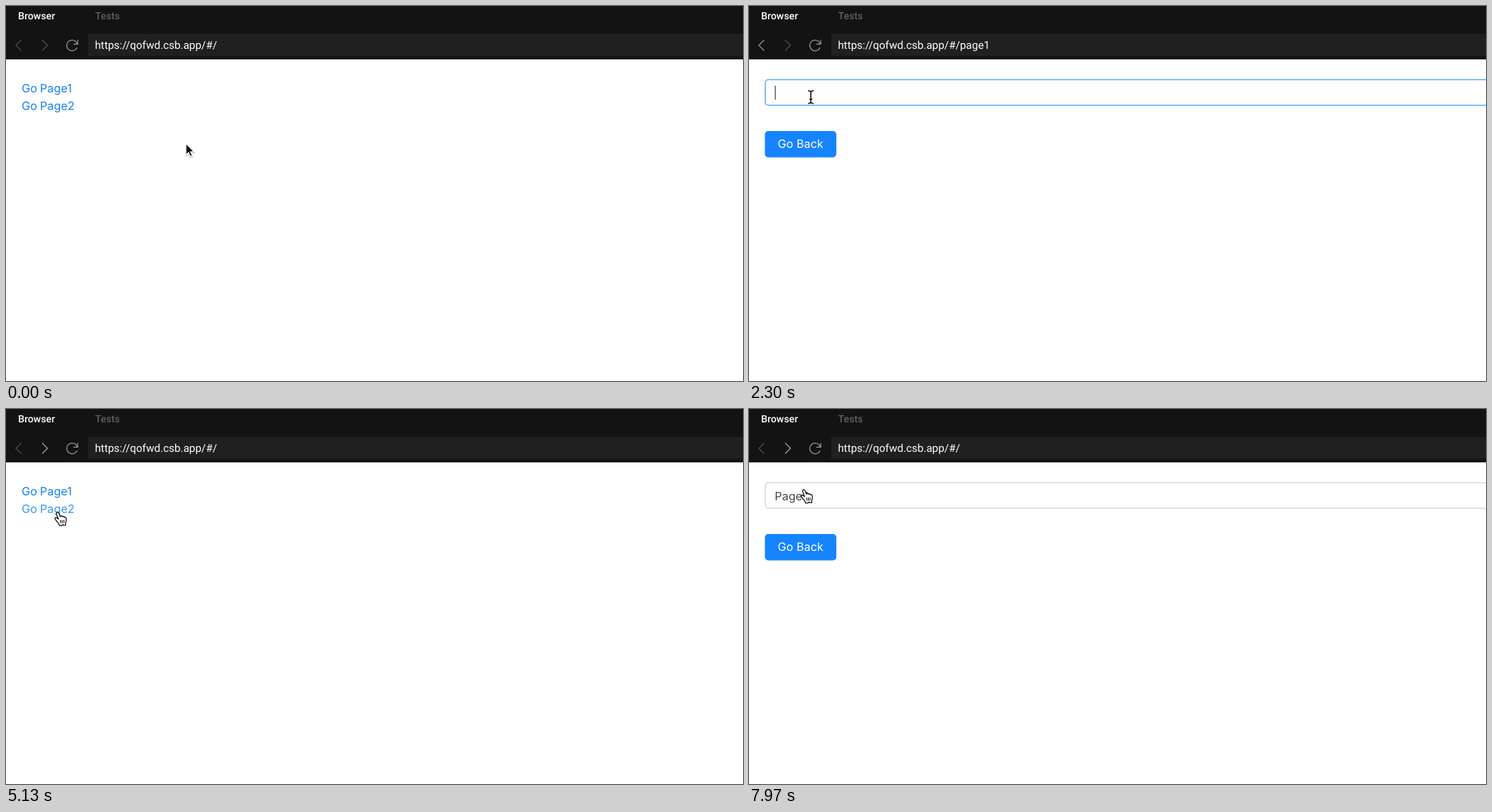
Recreate the animation shown at these times as an HTML page. Size 1048 px wide and 534 px high, loop 8000 ms.

```html
<!DOCTYPE html>
<html lang="en">
<head>
<meta charset="utf-8">
<title>Page navigation</title>
<style>
  html, body { margin: 0; width: 100%; height: 100%; overflow: hidden; background: #fff; }
  svg { display: block; width: 1048px; height: 534px; }
  text { white-space: pre; text-rendering: geometricPrecision; }
  .bar { font-family: Roboto, sans-serif; }
  .app { font-family: Inter, sans-serif; font-size: 16.4px; }
  .icon { fill: none; stroke-width: 1.2; }
</style>
</head>
<body>
<svg viewBox="0 0 1048 534">
  <rect width="1048" height="76" fill="#131313"/>
  <rect x="117" y="40" width="931" height="31" fill="#202020"/>
  <g class="bar">
    <text x="17.2" y="19" font-size="14.25" font-weight="500" fill="#fff">Browser</text>
    <text x="126.8" y="19" font-size="14.25" font-weight="500" fill="#606060">Tests</text>
    <text id="url" x="126.4" y="60.5" font-size="15.4" fill="#fff"></text>
  </g>
  <path id="back" class="icon" d="M21.5 48.5L14 56L21.5 63.5"/>
  <path id="forward" class="icon" d="M51.5 48.5L59 56L51.5 63.5"/>
  <path class="icon" stroke="#999" d="M101.3 54A7.6 7.6 0 1 0 101 59.2M102 48.3V54.3H95.8"/>

  <g id="home" class="app">
    <rect id="mark" x="48.6" y="129" width="48.8" height="25" fill="#4084fb"/>
    <text id="link1" y="123"><tspan x="22.3">Go</tspan><tspan x="48.3">Page1</tspan></text>
    <text id="link2" y="148"><tspan x="22.3">Go</tspan><tspan id="word2" x="48.3">Page2</tspan></text>
  </g>

  <g id="page" class="app">
    <rect id="glow" x="22.6" y="104.2" width="1100" height="37.8" rx="4.75" fill="none" stroke="#1784ff" stroke-width="4.8"/>
    <rect id="field" x="23.2" y="104.8" width="1100" height="36.6" rx="4.4" fill="#fff" stroke-width="1.3"/>
    <text id="value" x="36.6" y="130.3" fill="#484848"></text>
    <rect id="caret" y="113.5" width="1.1" height="20" fill="#333"/>
    <rect x="22.6" y="180" width="101.6" height="37" rx="4.75" opacity=".045"/>
    <rect id="button" x="22.6" y="178" width="101.6" height="37.4" rx="4.75"/>
    <text x="73.3" y="202.4" text-anchor="middle" fill="#fff">Go Back</text>
  </g>

  <g id="cursor">
    <g id="arrow">
      <path d="M0 1.5V17.5L3.8 14L6.2 19.8L9 18.6L6.6 13H11.4Z" opacity=".18" stroke="#000" stroke-width="2"/>
      <path d="M0 0V16L3.7 12.5L6 18.1L8.7 17L6.3 11.5H11.3Z" stroke="#fff" stroke-width="1.1"/>
    </g>
    <g id="hand" transform="translate(-6 -1)" stroke="#000" stroke-width="1.2" stroke-linejoin="round" stroke-linecap="round">
      <path fill="#fff" d="M6.4 17.4C5.6 15.8 4 14.6 2.6 12.5C1.6 11.2.6 10 1.2 9C1.9 8 3.3 8.3 4.2 9.2L6 10.8L3.6 4.4C2.9 2.5 3.1 1.1 4.4.8C5.7.6 6.5 1.6 7.1 3.2L8.7 7.2C9.2 5.9 11 5.8 11.6 7.3C12.4 6.5 14 6.7 14.5 8.2C15.5 7.6 16.9 8.2 17.1 9.8C17.5 12.5 17 14 16.3 16L16.2 19.5H13.6L12.4 18.3L11 19.8H7.4Z"/>
      <path fill="none" stroke-width="1" d="M9 12.5L9.2 16.2M11.4 12.4L11.5 16.2M13.8 12.4V16"/>
    </g>
    <g id="beam" fill="none">
      <path id="beamShape" stroke="#fff" stroke-width="3" opacity=".8" d="M-4 -9Q-.6 -9 0 -7.3Q.6 -9 4 -9M0 -7.5V7.5M-4 9Q-.6 9 0 7.3Q.6 9 4 9M-2.2 3H2.2"/>
      <path stroke="#000" stroke-width="1.5" d="M-4 -9Q-.6 -9 0 -7.3Q.6 -9 4 -9M0 -7.5V7.5M-4 9Q-.6 9 0 7.3Q.6 9 4 9M-2.2 3H2.2"/>
    </g>
  </g>
</svg>
<script>
const LOOP = 8000;
const el = {};
document.querySelectorAll('[id]').forEach(n => el[n.id] = n);

// Pointer path: time, x, y
const path = [
  [0, 256, 196], [270, 256, 196], [920, 80, 112], [1070, 75, 107], [1330, 75, 113],
  [1570, 76, 115], [1700, 86.5, 129.5], [1980, 86.5, 129.5], [2000, 87.5, 129.5],
  [3600, 92, 131], [3670, 128, 140.5], [3760, 130, 150], [4080, 80, 195],
  [4500, 79, 196], [5120, 74.5, 147], [5400, 74.5, 147], [5800, 74.5, 114],
  [6470, 74.5, 114], [6860, 77, 196], [7270, 77, 196], [7880, 79, 115], [8000, 79, 115]
];
const typing = [[2700, 'p'], [2830, 'pa'], [3030, 'pag'], [3170, 'page'], [3400, 'page1']];

// Time windows
const pages = [[1570, 4330], [5230, 7030], [7970, 8000]];
const focus = [[2220, 4230], [5830, 6960]];
const lit = [[1670, 4230], [5580, 6960]];
const press = [[3960, 4330], [6720, 7030]];
const hover1 = [[900, 1570], [7780, 7970]];
const hover2 = [[4900, 5230], [7560, 7780]];

const smooth = k => { k = Math.min(1, Math.max(0, k)); return k * k * (3 - 2 * k); };
const within = (t, list) => list.some(([a, b]) => t >= a && t < b);
const fade = (t, list) => list.reduce((s, [a, b]) => s + smooth((t - a) / 300) - smooth((t - b) / 300), 0);
const mix = (a, b, k) => `rgb(${a.map((v, i) => Math.round(v + (b[i] - v) * k))})`;
const show = (node, on) => node.style.display = on ? '' : 'none';
const setText = (node, s) => { if (node.textContent !== s) node.textContent = s; };

const BLUE = [23, 132, 255], LIGHT = [64, 158, 255], GREY = [208, 208, 208];
const LINK = [22, 128, 240], LINK_HOVER = [66, 155, 245];

function pointer(t) {
  let i = 1;
  while (i < path.length - 1 && path[i][0] <= t) i++;
  const [a, x, y] = path[i - 1], [b, u, v] = path[i];
  const k = smooth((t - a) / (b - a));
  return [x + (u - x) * k, y + (v - y) * k];
}

function pointerKind(x, y, onPage) {
  if (!onPage) return y >= 104 && y < 154 && x < 97 ? 'hand' : 'arrow';
  if (y >= 104 && y < 142) return 'beam';
  return y >= 178 && y < 216 && x < 124 ? 'hand' : 'arrow';
}

function drawBar(t) {
  const first = t >= 1700 && t < 4400, second = t >= 5270 && t < 7130;
  const inside = first || second;
  setText(el.url, 'https://qofwd.csb.app/#/' + (first ? 'page1' : second ? 'page2' : ''));
  el.back.setAttribute('stroke', inside ? '#999' : '#505050');
  el.forward.setAttribute('stroke', !inside && t > 4000 ? '#aaa' : '#555');
}

function drawHome(t) {
  const marked = t >= 30 && t < 1500;
  show(el.mark, marked);
  el.link1.setAttribute('fill', mix(LINK, LINK_HOVER, fade(t, hover1)));
  el.link2.setAttribute('fill', mix(LINK, LINK_HOVER, fade(t, hover2)));
  el.word2.setAttribute('fill', marked ? '#fff' : 'inherit');
  if (!marked) el.word2.removeAttribute('fill');
}

function drawPage(t) {
  const typed = typing.filter(s => s[0] <= t).pop();
  const first = t < 5000;
  setText(el.value, first ? (typed ? typed[1] : '') : 'Page2');
  el.glow.setAttribute('opacity', 0.22 * fade(t, focus));
  el.field.setAttribute('stroke', mix(GREY, LIGHT, fade(t, lit)));
  el.button.setAttribute('fill', mix(BLUE, LIGHT, fade(t, press)));
  show(el.caret, within(t, focus));
  const end = typed ? 37.6 + el.value.getComputedTextLength() : 36.8;
  el.caret.setAttribute('x', first ? end : 74.8);
}

function draw(t) {
  const onPage = within(t, pages);
  show(el.home, !onPage);
  show(el.page, onPage);
  drawBar(t);
  if (onPage) drawPage(t); else drawHome(t);

  // The pointer shape follows the content slightly late
  const [x, y] = pointer(t);
  const kind = pointerKind(x, y, within(t - 90, pages));
  ['arrow', 'hand', 'beam'].forEach(k => show(el[k], k === kind));
  show(el.cursor, t < 2700 || t >= 3600);
  el.cursor.setAttribute('transform', `translate(${x} ${y})`);
}

const start = performance.now();
function tick() {
  draw((performance.now() - start) % LOOP);
  requestAnimationFrame(tick);
}
tick();
</script>
</body>
</html>
```
